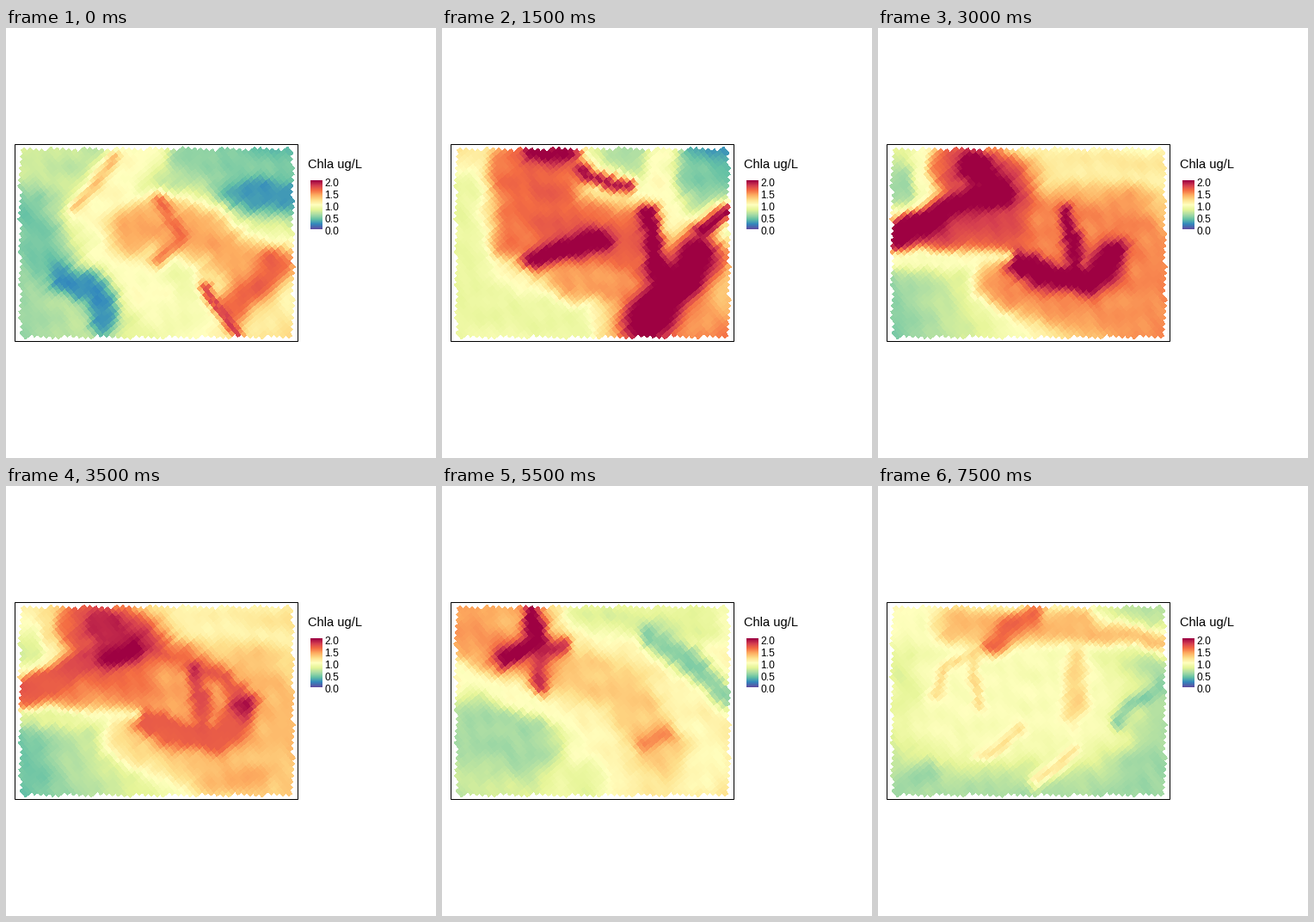
These frames come from a looping animation (500 by 500 pixels, 8 s). A matplotlib script:

```python
import numpy as np
import matplotlib.pyplot as plt
from matplotlib.animation import FuncAnimation
from matplotlib.collections import PolyCollection
from matplotlib.patches import Rectangle

SIZE = 500
LEFT, RIGHT, TOP, BOTTOM = 17.3, 332.7, 141.3, 358.7
CELL, TILT = 4.9, np.radians(40)
STEP_MS, STEPS = 500, 16
CMAP = plt.get_cmap("Spectral_r")
COS, SIN = np.cos(TILT), np.sin(TILT)
rng = np.random.default_rng(4)


def tilted_grid():
    """Centres and rows of the cells of a tilted square grid."""
    col, row = np.meshgrid(np.arange(-60, 61), np.arange(-60, 61))
    x = 175 + CELL * (col * COS + row * SIN)
    y = 250 + CELL * (row * COS - col * SIN)
    keep = (x > LEFT) & (x < RIGHT) & (y > TOP) & (y < BOTTOM)
    return x[keep], y[keep], row[keep]


X, Y, ROW = tilted_grid()


def ripple(scale):
    """Smooth random waves over the cells, about -1 to 1."""
    total = np.zeros_like(X)
    for _ in range(6):
        a, phase = rng.uniform(0, 2 * np.pi, 2)
        k = 2 * np.pi / (scale * rng.uniform(0.7, 1.5))
        total += np.sin(k * (X * np.cos(a) + Y * np.sin(a)) + phase)
    return total / 3


# Rows slip along the tilt and the water curls, which feathers every edge.
slip = rng.uniform(-2.5, 2.5, 121)[ROW + 60]
WX = X + 3 * ripple(45) + slip * COS
WY = Y + 3 * ripple(45) - slip * SIN
GRAIN = 1.5 * ripple(26)


class Field:
    """Chlorophyll map in percent of the colour scale, built from soft plumes."""

    def __init__(self, tl, tr, bl, br):
        u, v = (X - 15) / 320, (Y - 139) / 222
        self.z = (tl * (1 - u) + tr * u) * (1 - v) + (bl * (1 - u) + br * u) * v

    def plume(self, value, width, *path):
        """Blend towards a value around a path; wider plumes have softer rims."""
        pts = np.reshape(path, (-1, 2))
        dist = np.hypot(WX - pts[0, 0], WY - pts[0, 1])
        for (x0, y0), (dx, dy) in zip(pts, np.diff(pts, axis=0)):
            t = ((WX - x0) * dx + (WY - y0) * dy) / (dx * dx + dy * dy)
            t = np.clip(t, 0, 1)
            dist = np.minimum(dist, np.hypot(WX - x0 - t * dx, WY - y0 - t * dy))
        rim = 2 + width / 7
        self.z += (value - self.z) / (1 + np.exp((dist - width) / rim))
        return self

    def cells(self):
        return np.clip(self.z + GRAIN, 0, 100)


def arch():
    return (Field(38, 18, 26, 62)
            .plume(22, 28, 25, 215, 45, 265)
            .plume(51, 25, 160, 145, 95, 215)
            .plume(70, 5, 128, 150, 80, 212)
            .plume(11, 18, 265, 195, 330, 195)
            .plume(50, 38, 130, 240, 180, 228, 235, 240, 265, 283, 315, 276)
            .plume(50, 28, 125, 275, 175, 315)
            .plume(71, 28, 150, 235, 185, 224, 235, 242, 290, 290)
            .plume(81, 7, 178, 272, 205, 240, 180, 200)
            .plume(83, 18, 316, 275, 272, 322)
            .plume(94, 7, 232, 302, 268, 355)
            .plume(10, 15, 65, 290, 110, 305, 115, 340))


def bloom():
    return (Field(60, 10, 42, 80)
            .plume(42, 28, 20, 190, 30, 320, 150, 345)
            .plume(77, 18, 75, 155, 78, 250)
            .plume(83, 45, 120, 175, 130, 232, 215, 250)
            .plume(73, 17, 145, 292, 205, 300)
            .plume(51, 18, 255, 150, 252, 185, 268, 220)
            .plume(24, 20, 305, 180)
            .plume(104, 10, 100, 145, 150, 148)
            .plume(102, 8, 165, 168, 215, 185)
            .plume(106, 13, 110, 273, 140, 255, 185, 248)
            .plume(106, 29, 238, 338, 270, 305, 298, 268)
            .plume(106, 11, 242, 215, 250, 285)
            .plume(106, 9, 300, 235, 334, 212))


def swirl():
    return (Field(40, 45, 22, 78)
            .plume(76, 58, 170, 240, 280, 240, 320, 310)
            .plume(74, 22, 140, 300, 200, 325, 310, 335)
            .plume(57, 16, 195, 155, 330, 158)
            .plume(88, 34, 95, 160, 150, 180, 140, 220)
            .plume(88, 23, 20, 237, 100, 237)
            .plume(106, 17, 25, 240, 90, 205, 145, 192, 112, 160)
            .plume(106, 16, 162, 272, 190, 288, 252, 296, 274, 262)
            .plume(104, 8, 220, 215, 232, 275)
            .plume(50, 8, 15, 272, 95, 274, 150, 264)
            .plume(50, 9, 50, 145, 45, 200, 15, 212)
            .plume(28, 13, 26, 170, 26, 195))


def retreat():
    return (Field(84, 66, 12, 42)
            .plume(50, 50, 230, 165, 290, 205, 250, 290)
            .plume(62, 34, 30, 190, 120, 225, 215, 240)
            .plume(82, 24, 30, 148, 80, 168, 150, 178)
            .plume(88, 13, 140, 155, 195, 190, 255, 225, 278, 255)
            .plume(105, 11, 120, 203, 165, 180, 200, 190)
            .plume(102, 5, 235, 216, 258, 222, 285, 252)
            .plume(50, 16, 20, 205, 80, 245, 195, 285)
            .plume(26, 33, 60, 290, 145, 335)
            .plume(11, 19, 20, 280, 40, 330)
            .plume(64, 13, 235, 347, 290, 340))


def wedge():
    return (Field(72, 46, 32, 66)
            .plume(29, 45, 40, 285, 95, 300)
            .plume(40, 22, 165, 345)
            .plume(39, 22, 165, 150, 300, 160)
            .plume(23, 14, 245, 175, 290, 206, 334, 248)
            .plume(51, 44, 165, 225, 250, 272, 300, 320)
            .plume(64, 30, 165, 220, 215, 240, 255, 310)
            .plume(77, 9, 235, 300, 260, 290)
            .plume(73, 27, 30, 170, 120, 205)
            .plume(50, 8, 15, 210, 95, 252, 150, 274)
            .plume(106, 12, 104, 145, 112, 180, 72, 202)
            .plume(94, 9, 140, 182, 116, 195, 115, 232))


def hook():
    return (Field(50, 18, 32, 42)
            .plume(54, 58, 110, 190, 150, 225, 190, 255)
            .plume(20, 42, 300, 170, 310, 215)
            .plume(33, 16, 248, 175, 232, 235)
            .plume(90, 11, 100, 143, 128, 148)
            .plume(68, 14, 130, 165, 75, 195)
            .plume(76, 12, 20, 220, 45, 245, 100, 262)
            .plume(82, 13, 90, 220, 108, 212)
            .plume(79, 7, 150, 270, 195, 228)
            .plume(45, 9, 262, 222, 270, 270, 312, 262)
            .plume(13, 6, 288, 232, 330, 238)
            .plume(59, 22, 175, 310, 265, 308)
            .plume(75, 7, 218, 312, 235, 290)
            .plume(33, 24, 35, 320, 110, 345))


def calm():
    return (Field(52, 32, 30, 28)
            .plume(48, 70, 90, 250, 230, 255)
            .plume(40, 16, 28, 205, 35, 245)
            .plume(68, 20, 90, 160, 150, 166, 235, 160)
            .plume(68, 14, 225, 165, 334, 180)
            .plume(83, 11, 130, 185, 178, 150)
            .plume(63, 5, 68, 240, 78, 212, 112, 195, 117, 255)
            .plume(63, 11, 232, 200, 230, 262)
            .plume(61, 6, 122, 315, 165, 285)
            .plume(61, 6, 185, 345, 228, 308)
            .plume(24, 8, 280, 270, 330, 232)
            .plume(28, 22, 310, 335)
            .plume(28, 14, 30, 350, 60, 335))


# Step at which each map is reached; the steps between are blends.
KEYS = {0: arch, 3: bloom, 6: swirl, 9: retreat, 11: wedge, 13: hook, 15: calm}
TIMES = list(KEYS)
MAPS = [make().cells() for make in KEYS.values()]


def values(step):
    k = min(np.searchsorted(TIMES, step, side="right"), len(TIMES) - 1)
    t = (step - TIMES[k - 1]) / (TIMES[k] - TIMES[k - 1])
    return MAPS[k - 1] * (1 - t) + MAPS[k] * t


plt.rcParams["font.family"] = "Liberation Sans"
fig = plt.figure(figsize=(5, 5), dpi=100, facecolor="white")
ax = fig.add_axes([0, 0, 1, 1])
ax.axis("off")

turn = np.pi / 4 - TILT + np.arange(4) * np.pi / 2
corners = np.column_stack([np.cos(turn), np.sin(turn)]) * CELL / np.sqrt(2)
cells = PolyCollection(np.column_stack([X, Y])[:, None] + corners,
                       linewidths=0, antialiased=False)
ax.add_collection(cells)
ax.add_patch(Rectangle((10, 135), 329, 229, fill=False, ec="black", lw=0.72))

# Legend
ax.imshow(np.linspace(1, 0, 57)[:, None], cmap=CMAP, aspect="auto",
          extent=(354, 368, 234, 177), interpolation="nearest")
ax.text(351, 163.4, "Chla ug/L", fontsize=14.67 * 0.72)
for n in range(5):
    ax.text(370.4, 184.4 + 14 * n, f"{2 - n / 2:.1f}", fontsize=12 * 0.72)
ax.set(xlim=(0, SIZE), ylim=(SIZE, 0))


def draw(step):
    cells.set_facecolor(CMAP(values(step) / 100))
    return [cells]


anim = FuncAnimation(fig, draw, frames=STEPS, interval=STEP_MS, repeat=True,
                     repeat_delay=0)
plt.show()
```
